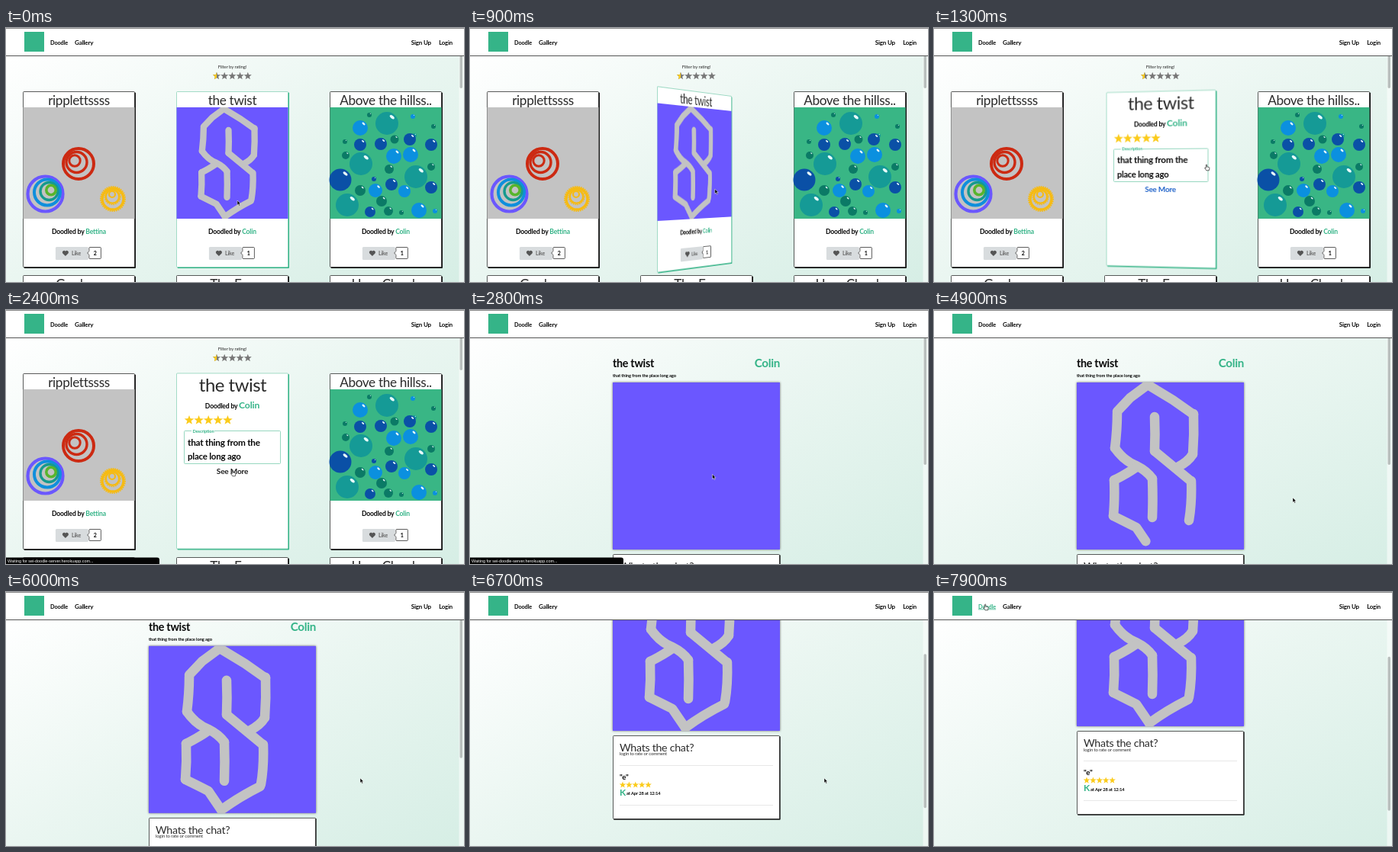
Write an HTML page that moves like this. It is 600x333 px and loops after 8 s.

```html
<!DOCTYPE html>
<html lang="en">
<head>
<meta charset="utf-8">
<title>Doodle gallery</title>
<style>
  html, body { margin: 0; width: 100%; height: 100%; overflow: hidden; }
  #stage {
    position: relative; width: 600px; height: 333px; overflow: hidden;
    background: linear-gradient(to bottom right, #fff 5%, #eaf6f1 50%, #d6eee5);
  }
  #stage div, svg { position: absolute; left: 0; top: 0; width: 600px; height: 333px; }
  svg { overflow: visible; }
  text { font-family: Lato, "Open Sans", sans-serif; letter-spacing: -.02em; fill: #2b2b2b; white-space: pre; }
  .b { font-weight: 700; fill: #080808; }
  .green { fill: #35b488; }
  #flip { perspective: 1000px; perspective-origin: 297px 199px; }
  #turner { transform-style: preserve-3d; transform-origin: 297px 199px; }
  .face { backface-visibility: hidden; transform-origin: 297px 199px; }
  #back { transform: rotateY(180deg); }
</style>
</head>
<body>
<div id="stage">
  <div id="gallery">
    <svg id="grid"></svg>
    <div id="flip"><div id="turner">
      <div class="face" id="front"></div>
      <div class="face" id="back"></div>
    </div></div>
  </div>
  <svg id="detail"></svg>
  <svg id="chrome"></svg>
</div>
<script>
const $ = id => document.getElementById(id);
const GREEN = '#35b488', GOLD = '#fbcb1b', GREY = '#c3c3c3', INK = '#151515', PURPLE = '#6b57ff';

const text = (x, y, size, str, cls = '', anchor = 'start', extra = '') =>
  `<text x="${x}" y="${y}" font-size="${size}" class="${cls}" text-anchor="${anchor}" ${extra}>${str}</text>`;
const rect = (x, y, w, h, fill, extra = '') =>
  `<rect x="${x}" y="${y}" width="${w}" height="${h}" fill="${fill}" ${extra}/>`;
const circle = (x, y, r, fill, extra = '') =>
  `<circle cx="${x}" cy="${y}" r="${r}" fill="${fill}" ${extra}/>`;
const ring = (x, y, r, width, color, extra = '') =>
  circle(x, y, r, 'none', `stroke="${color}" stroke-width="${width}" ${extra}`);
const hline = (x1, x2, y, color) =>
  `<path d="M${x1} ${y}H${x2}" stroke="${color}" stroke-width="1"/>`;

function star(cx, cy, r, fill) {
  const pts = [];
  for (let i = 0; i < 10; i++) {
    const a = i * Math.PI / 5, q = i % 2 ? r * .42 : r;
    pts.push((cx + q * Math.sin(a)).toFixed(2) + ',' + (cy - q * Math.cos(a)).toFixed(2));
  }
  return `<polygon points="${pts.join(' ')}" fill="${fill}"/>`;
}
const stars = (x, y, r, pitch, fill) =>
  [0, 1, 2, 3, 4].map(i => star(x + i * pitch, y, r, fill)).join('');

// The S doodle, in the order its strokes are made, on a 219 px canvas.
const strokes = [
  'M53 41Q53 62 50 86', 'M102 45Q103 68 102 90', 'M153 41Q154 68 152 94',
  'M49 128Q50 152 48 175', 'M99 126Q100 152 99 177', 'M150 129Q151 158 147 181',
  'M102 90L148 128', 'M50 86Q62 103 78 109Q92 116 99 126', 'M53 38L70 20L93 3',
  'M93 3L126 23L153 42', 'M152 94Q146 104 132 111', 'M49 128Q62 122 78 111',
  'M48 175L78 190L95 215', 'M95 215Q118 198 146 184'
];
const doodle = strokes.map(d => `<path d="${d}"/>`).join('');
const penStyle = `fill="none" stroke="${GREY}" stroke-width="12.5" stroke-linecap="round" stroke-linejoin="round"`;

function ringArt() {
  const dotted = 'stroke-dasharray="1.6 1.2"';
  let s = rect(22.5, 104, 146, 146, GREY);
  s += ring(51.5, 217.5, 23, 4.2, PURPLE) + ring(54, 215.5, 17, 4, '#0f8fdc')
     + ring(56.5, 214, 11.5, 3.4, '#169a8e') + ring(59, 212.5, 6.2, 3.6, '#58b52c');
  s += ring(95, 178, 20, 4, '#cc2a12') + ring(92.5, 176, 13.5, 3.4, '#cc2a12')
     + ring(90, 174, 7.2, 3, '#cc2a12');
  s += ring(140, 224, 14, 3.4, '#f6bb13') + ring(140, 224, 16.2, 1.6, '#f6bb13', dotted)
     + ring(139.5, 221, 8.8, 2.6, '#f6bb13') + ring(139.5, 221, 10.6, 1.2, '#f6bb13', dotted)
     + ring(139, 218, 4, 2.2, '#f6bb13');
  return s;
}

const bubbles = {
  '#159a96': '499,125,15 465,178,15 537,195,15 447,232,15 535,141,3',
  '#0b7a66': '476,114,3 560,129,3 444,149,3 509,146,5.5 502,185,6 445,167,5 557,182,5 464,213,7 492,227,7 501,240,6 518,242,3',
  '#0b90df': '533,116,3 464,131,10 508,168,10 530,166,10 484,213,9 522,214,8 541,239,10 562,240,3',
  '#0a50a6': '464,153,8 491,152,8 529,146,8 557,153,8 482,198,3 438,199,14.5 505,205,8 557,209,8 477,241,7'
};
function bubbleArt() {
  let s = rect(424.5, 104, 146, 146, '#39b685');
  for (const [color, list] of Object.entries(bubbles))
    for (const [x, y, r] of list.split(' ').map(p => p.split(',').map(Number))) {
      const hx = x + r * .45, hy = y - r * .55;
      s += circle(x, y, r, color) +
        `<ellipse cx="${hx}" cy="${hy}" rx="${r * .24}" ry="${r * .12}" fill="#e8fafa" transform="rotate(40 ${hx} ${hy})"/>`;
    }
  return s;
}
const shapeArt = () => rect(223.5, 104, 146, 146, PURPLE) +
  `<svg x="223.5" y="104" width="146" height="146" viewBox="0 0 219 219" style="position:static;overflow:hidden"><g ${penStyle}>${doodle}</g></svg>`;

function frame(x, y, shadow, line = shadow) {
  return rect(x + 1.5, y + 1.5, 146.5, 230.5, shadow, 'rx="1"') +
    rect(x + .5, y + .5, 146, 230, '#fff', `stroke="${line}" stroke-width=".7" rx="1"`);
}

function likes(cx, count) {
  const x = cx - 30.6;
  return rect(x, 287, 43, 17, '#d8dcde', 'rx="1.5"') +
    `<path d="M${x + 13} 299l-3.6-3.6a2.1 2.1 0 0 1 3.6-2.6a2.1 2.1 0 0 1 3.6 2.6z" fill="#555"/>` +
    text(x + 21, 298, 7, 'Like', 'b', 'start', 'style="fill:#666"') +
    `<path d="M${x + 45} 287.5h13.5q1 0 1 1v13q0 1-1 1h-13.5q-1 0-1-1v-4l-2.2-2.5l2.2-2.5v-4q0-1 1-1z" fill="#fff" stroke="#333" stroke-width=".8"/>` +
    text(x + 51.8, 298, 7, count, 'b', 'middle');
}

function card(x, title, author, count, art, shadow = INK, line = shadow) {
  const cx = x + 73.5;
  return frame(x, 83, shadow, line) + text(cx, 101, 17.2, title, '', 'middle') + art +
    text(cx, 269.5, 8.6, `Doodled by <tspan class="green">${author}</tspan>`, 'b', 'middle') +
    likes(cx, count);
}
const lowerCard = (x, title) => frame(x, 324, INK) + text(x + 73.5, 342, 17.2, title, '', 'middle');
const PALE = '#7fcdb1';

$('grid').innerHTML =
  text(296.5, 53, 6, 'Filter by rating!', '', 'middle') +
  stars(276, 63, 5.3, 10.2, '#777') +
  `<g style="clip-path:inset(0 50% 0 0)">${star(276, 63, 5.3, GOLD)}</g>` +
  card(22, 'ripplettssss', 'Bettina', 2, ringArt()) +
  card(424, 'Above the hillss..', 'Colin', 1, bubbleArt()) +
  lowerCard(22, 'Gardens') + lowerCard(223, 'The Fog') + lowerCard(424, 'Hazy Clouds') +
  rect(593.5, 37, 6.5, 296, '#fff', 'opacity=".55"') + rect(594.5, 2, 3.5, 77, '#b9bfbd', 'rx="1.7"');

$('front').innerHTML = `<svg>${card(223, 'the twist', 'Colin', 1, shapeArt(), GREEN, PALE)}</svg>`;

$('back').innerHTML = '<svg>' + frame(223, 82.5, GREEN, PALE) +
  text(297, 107, 23.9, 'the twist', '', 'middle') +
  text(296.5, 129, 8.6, 'Doodled by <tspan class="green" font-size="12.2">Colin</tspan>', 'b', 'middle') +
  stars(240, 144.5, 6.6, 12.6, GOLD) +
  rect(233.5, 158.5, 126, 43, 'none', 'stroke="#7dcdb0" stroke-width=".8" rx="1"') +
  rect(243, 156, 30, 5, '#fff') + text(244.5, 160.5, 5.7, '<tspan class="green">Description</tspan>', 'b') +
  text(238, 177.5, 11.8, 'that thing from the', 'b') +
  text(238, 196, 11.5, 'place long ago', 'b') +
  text(296.5, 215, 10.1, 'See More', 'b', 'middle', 'id="more"') + '</svg>';

$('detail').innerHTML = `<g id="page">` +
  text(187, 75, 14.3, 'the twist', 'b') +
  text(406, 75, 15.2, '<tspan class="green">Colin</tspan>', 'b', 'end') +
  text(187, 88, 5.8, 'that thing from the place long ago', 'b') +
  rect(187, 95, 219, 219, PURPLE, 'style="filter:drop-shadow(0 0 1.5px #666)"') +
  `<svg x="187" y="95" width="219" height="219" viewBox="0 0 219 219" style="position:static;overflow:hidden"><g id="pen" ${penStyle}>${doodle}</g></svg>` +
  rect(188, 321, 218.7, 109.7, INK, 'rx="1"') +
  rect(187.5, 320.5, 218, 109, '#fff', `stroke="${INK}" stroke-width=".7" rx="1"`) +
  text(196, 341, 14.2, 'Whats the chat?') + text(196, 346.5, 6, 'login to rate or comment') +
  hline(196, 397, 359.5, '#e8e8e8') +
  text(196, 378, 9.5, '"e"', 'b') + stars(200, 385, 4.5, 8.4, GOLD) +
  text(196, 399, 12, '<tspan class="green">K</tspan>', 'b') +
  text(205, 398.5, 5.8, 'at Apr 28 at 12:14', 'b') +
  hline(196, 397, 411.5, '#e8e8e8') + '</g>' +
  rect(593.5, 37, 6.5, 296, '#fff', 'opacity=".55"') +
  rect(594.5, 1, 3.5, 202, '#b9bfbd', 'rx="1.7" id="thumb"');

$('chrome').innerHTML =
  rect(0, 0, 600, 36, '#fff') + hline(0, 600, .5, '#8a8a8a') + hline(0, 600, 36.5, '#555') +
  rect(24, 5, 26, 26, GREEN) +
  text(58, 21.5, 7.4, 'Doodle', 'b', 'start', 'id="link"') + text(90, 21.5, 8.1, 'Gallery', 'b') +
  text(557, 21.5, 8, 'Sign Up', 'b', 'end') + text(585, 21.5, 7.7, 'Login', 'b', 'end') +
  `<g id="status"><path d="M0 324.5H198q3 0 3 3V333H0z" fill="#050505"/>` +
  text(2, 331, 5.45, 'Waiting for sei-doodle-server.herokuapp.com...', '', 'start',
    'style="fill:#fff;letter-spacing:0;font-family:\'Liberation Sans\',sans-serif"') + '</g>' +
  '<g id="cursor" stroke-linejoin="round">' +
  '<path id="arrow" d="M0 0V6.2L1.5 4.9L2.5 7.2L3.6 6.7L2.6 4.5H4.5z" fill="#000" stroke="#fff" stroke-width=".5"/>' +
  '<path id="hand" d="M-.7 .4q.7-.9 1.3 0V3l2.6.5q.8.3.7 1.2L3.3 7.8H-.2L-2.4 4.6q.1-1 1.7 0z" fill="#fff" stroke="#222" stroke-width=".7"/></g>';

const pen = [...$('pen').children].map(el => ({ el, len: el.getTotalLength() }));
const inkTotal = pen.reduce((sum, p) => sum + p.len, 0);

const LOOP = 8000, OPEN = 2600;
const pointer = [
  [0, 303, 226], [700, 305, 225], [1250, 357, 179], [1450, 357, 179], [2000, 297, 210], [2600, 297, 210],
  [3500, 458, 252], [3900, 459, 252], [4500, 470, 247], [4900, 470, 246], [5400, 464, 244],
  [7250, 464, 244], [7700, 68, 16], [8000, 67, 16]
];
const scroll = [[0, 0], [5550, 0], [6000, 24], [6350, 88], [6700, 132], [7050, 138], [8000, 138]];

const smooth = p => p * p * (3 - 2 * p);
const clamp = p => Math.min(1, Math.max(0, p));

// Value of column c in a table of [time, ...values] steps.
function at(table, t, c, ease = p => p) {
  const i = Math.max(1, table.findIndex(row => row[0] >= t));
  const a = table[i - 1], b = table[i];
  return a[c] + (b[c] - a[c]) * ease((t - a[0]) / (b[0] - a[0]));
}

// The CSS "ease" curve: cubic-bezier(.25, .1, .25, 1).
function cssEase(x) {
  let lo = 0, hi = 1, s = .5;
  for (let i = 0; i < 20; i++) {
    s = (lo + hi) / 2;
    const bx = .75 * s * (1 - s) ** 2 + .75 * s * s * (1 - s) + s ** 3;
    if (bx < x) lo = s; else hi = s;
  }
  return .3 * s * (1 - s) ** 2 + 3 * s * s * (1 - s) + s ** 3;
}

const show = (id, on) => { $(id).style.display = on ? '' : 'none'; };

function drawInk(t) {
  let left = clamp((t - 2850) / 2263) * inkTotal;
  for (const { el, len } of pen) {
    el.style.display = left > 0 ? '' : 'none';
    el.style.strokeDasharray = left >= len ? 'none' : `${Math.max(left, .01)} ${len + 20}`;
    left -= len;
  }
}

function render(t) {
  const opened = t >= OPEN;
  show('gallery', !opened);
  show('detail', opened);
  show('status', t >= 2250 && t < 2850);

  $('turner').style.transform = `rotateY(${180 * cssEase(clamp((t - 750) / 800))}deg)`;
  $('more').style.fill = t < 1950 ? '#1f62c9' : '#222';

  const y = at(scroll, t, 1);
  $('page').setAttribute('transform', `translate(0 ${-y})`);
  $('thumb').setAttribute('y', 1 + y * .607);
  drawInk(t);

  const overLink = t >= 7650;
  $('link').style.fill = overLink ? GREEN : '';
  $('link').style.textDecoration = overLink ? 'underline' : 'none';

  const hand = overLink || (t >= 990 && !opened);
  show('hand', hand);
  show('arrow', !hand);
  $('cursor').setAttribute('transform', `translate(${at(pointer, t, 1, smooth)} ${at(pointer, t, 2, smooth)})`);
}

const start = performance.now();
function tick() {
  render((performance.now() - start) % LOOP);
  requestAnimationFrame(tick);
}
tick();
</script>
</body>
</html>
```
